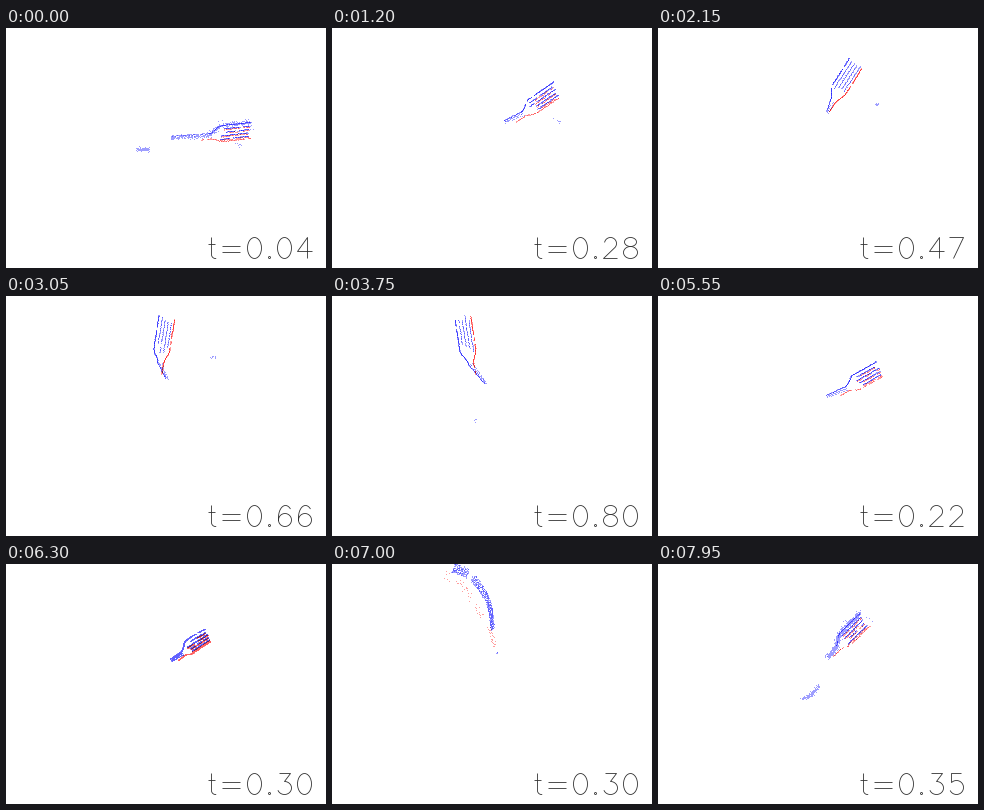
These frames come from a looping animation (320x240 px, 8 s). A matplotlib script:

```python
import numpy as np
import matplotlib.pyplot as plt
from matplotlib.animation import FuncAnimation
from matplotlib.collections import LineCollection

W, H, FRAMES, STEP_MS = 320, 240, 160, 50
SECOND_RUN, ORBIT_START, ORBIT_END = 93, 119, 154
PIVOT = np.array([143.0, 124.0])
CAM_DIST = 95.0
FADE = 0.62          # how much one event dims the other channels


# ---------- stroke lettering ----------
def arc(cx, cy, rx, ry, a0=0, a1=360):
    a = np.radians(np.linspace(a0, a1, 28))
    return list(zip(cx + rx * np.cos(a), cy + ry * np.sin(a)))


SIX = arc(11, 9, 7, 12, 45, 180) + arc(10.5, 6.5, 6.5, 6.5, 180, -180)
WIDTHS = {"t": 12, "=": 26, ".": 10}
GLYPHS = {
    "t": [[(5, 21)] + arc(9, 4, 4, 4, 180, 280), [(2, 14), (9, 14)]],
    "=": [[(4, y), (22, y)] for y in (12, 6)],
    ".": [arc(5, 1, 1, 1)],
    "0": [arc(10, 10.5, 7, 10.5)],
    "1": [[(6, 17), (8, 18), (11, 21), (11, 0)]],
    "2": [arc(10, 15, 6, 6, 170, -40) + [(3, 0), (17, 0)]],
    "3": [[(5, 21), (16, 21)] + arc(10, 6.5, 7, 6.5, 90, -160)],
    "4": [[(13, 0), (13, 21), (3, 7), (18, 7)]],
    "5": [[(15, 21), (5, 21)] + arc(10, 7, 7, 7, 135, -155)],
    "6": [SIX],
    "7": [[(3, 21), (17, 21), (7, 0)]],
    "8": [arc(10, 16.5, 6, 4.5), arc(10, 6, 7, 6)],
    "9": [[(20 - x, 21 - y) for x, y in SIX]],
}


def lettering(text, x=200.5, base=230.5):
    lines = []
    for ch in text:
        lines += [[(x + px, base - py) for px, py in s] for s in GLYPHS[ch]]
        x += WIDTHS.get(ch, 20)
    return lines


# ---------- timing ----------
def clock(i):
    """Hundredths of a second shown in the corner."""
    if i < SECOND_RUN:
        return int(4 + 1.02 * i)
    if i < ORBIT_START:
        return 4 + i - SECOND_RUN
    return 30 + max(0, i - ORBIT_END)


def orbit_angle(i):
    u = np.clip((i - ORBIT_START) / (ORBIT_END - ORBIT_START), 0, 1)
    return 2 * np.pi * u ** 3 * (u * (6 * u - 15) + 10)


def smooth(u):
    u = np.clip(u, 0, 1)
    return u * u * (3 - 2 * u)


def swing(degrees, radius):
    a = np.radians(degrees)
    return PIVOT + radius * np.array([np.cos(a), -np.sin(a)])


# ---------- event cloud ----------
class Events:
    """Brightness events gathered as a small cloud of 3D points."""

    def __init__(self, rng, density, cap):
        self.rng, self.density = rng, density
        self.caps = {"blue": cap, "red": cap, "haze": 1}
        self.parts = {name: [] for name in self.caps}

    def stroke(self, layer, pts, jitter=0.2, cover=0.96, rate=2.5):
        pts = np.asarray(pts, float)
        steps = np.hypot(*np.diff(pts[:, :2], axis=0).T)
        dist = np.concatenate([[0], np.cumsum(steps)])
        n = max(4, int(dist[-1] * rate * self.density))
        s = np.linspace(0, 1, n)
        chunks = max(3, int(dist[-1] / 3))
        on = self.rng.random(chunks) < cover
        s = s[on[np.minimum((s * chunks).astype(int), chunks - 1)]]
        xyz = np.stack([np.interp(s * dist[-1], dist, c) for c in pts.T], 1)
        xyz[:, :2] += self.rng.normal(0, jitter, (len(s), 2))
        xyz[:, 2] += self.rng.uniform(-1.5, 1.5, len(s))
        self.parts[layer].append(xyz)

    def spray(self, layer, centre, sx, sy, n):
        mean = (centre[0], centre[1], -10)
        self.parts[layer].append(self.rng.normal(mean, (sx, sy, 1), (n, 3)))

    def counts(self, layer, angle):
        out = np.zeros((H, W))
        if not self.parts[layer]:
            return out
        x, y, z = np.concatenate(self.parts[layer]).T
        keep = 1 - z / CAM_DIST
        x, y = (x - W / 2) * keep, (y - H / 2) * keep
        c, s = np.cos(angle), np.sin(angle)
        x, z = x * c + z * s, z * c - x * s
        zoom = 1 / np.maximum(1 - z / CAM_DIST, 0.2)
        col = np.floor(W / 2 + x * zoom).astype(int)
        row = np.floor(H / 2 + y * zoom).astype(int)
        ok = (col >= 0) & (col < W) & (row >= 0) & (row < H)
        np.add.at(out, (row[ok], col[ok]), 1)
        return np.minimum(out, self.caps[layer])


def fork_events(i):
    t = clock(i) / 100
    first = i < SECOND_RUN
    orbiting = ORBIT_START < i < ORBIT_END
    angle = orbit_angle(i)
    edge_on = abs(np.sin(angle)) > 0.5
    early = t < 0.45
    dense = 1.0 if i > ORBIT_END else 0.4 * max(0, 1 - i / 18)

    # the fork swings about the hand, speeding up slightly
    reach = 1 if first else 0.9
    turn = 7.5 + 102 * t + 11.5 * t * t + (0 if first else 2)
    tip = swing(turn, 105 * reach)
    base = swing(turn + 3 - 5.5 * t, (69 - 8 * t) * reach)
    grip = swing(30 + 55 * t, (24 + 24 * np.sin(np.pi * t)) * reach)
    axis = tip - base
    length = np.hypot(*axis)
    side = np.array([axis[1], -axis[0]]) / length

    def at(p, q):
        x, y = base + p * axis + q * side
        return x, y, -12 + 14 * max(p, 0) ** 2

    def outline(start, stop, neck, flare):
        ps = np.linspace(start, stop, 24)
        return [at(p, neck + flare * smooth((p + 0.15) / 0.35)) for p in ps]

    seed = ORBIT_START if ORBIT_START <= i <= ORBIT_END else i
    ev = Events(np.random.default_rng(seed + 7),
                5 if orbiting else 1, 2 if orbiting else 4)

    lead = outline(1, -0.15, 2, 6.5)
    trail = outline(0.95, -0.4, -3.5, -4)
    ev.stroke("blue", lead, rate=3)
    if edge_on:
        ev.stroke("red", trail, cover=0.5, rate=0.4)
    else:
        ev.stroke("red", trail, cover=0.9, rate=1.6 if early else 3)

        # tines
        for q in np.linspace(5, -5, 4):
            a, b = ev.rng.uniform(0.1, 0.35), ev.rng.uniform(0.85, 1)
            ev.stroke("blue", [at(a, q), at(b, q)], rate=2.4 if early else 1.5)
            if early:
                ev.stroke("red", [at(a, q - 1), at(b, q - 1)], cover=0.75, rate=1.3)

        # handle streaks
        for k, rate in zip((2, 0, -2), (2.2, 1, 0.7)):
            end = grip + k * 0.6 * side
            ev.stroke("blue", [at(-0.15, k), (*end, -12)],
                      rate=rate * (1 - 0.6 * dense))

    if dense:
        handle = [at(-0.15, 0.5), (*grip, -12)]
        ev.stroke("haze", lead, 1.3, 0.9, 9 * dense)
        ev.stroke("haze", handle, 1.3, 0.85, 9 * dense)
        ev.spray("haze", at(0.7, 4), 9, 6, int(24 * dense))
    if dense > 0.2:
        start = np.array([129 + 45 * t, 119 + 45 * t])
        stop = np.array([141 + 57 * t, 122])
        mid = (start + stop) / 2 + (0, 10 * t)
        ev.stroke("haze", [(*p, -10) for p in (start, mid, stop)], 0.9, 1, 7)

    # stray events
    if orbiting:
        ev.spray("blue", grip, 0.6, 0.6, 4)
    elif first and t < 0.8:
        ev.spray("haze", swing(2 + 64 * t, 90), 2.5, 1, 8)
    elif first:
        ev.spray("haze", PIVOT + 0.5, 0.5, 1, 4)
    return [ev.counts(layer, angle) for layer in ("blue", "red", "haze")]


def picture(i):
    blue, red, haze = fork_events(i)
    blue = np.maximum(blue, haze)
    return np.stack([FADE ** blue, FADE ** (blue + red), FADE ** red], -1)


fig = plt.figure(figsize=(4, 3), dpi=80, facecolor="white")
ax = fig.add_axes([0, 0, 1, 1])
ax.axis("off")
image = ax.imshow(np.ones((H, W, 3)), extent=(0, W, H, 0),
                  interpolation="nearest", aspect="auto")
label = LineCollection([], colors="#303030", linewidths=0.75)
label.set_snap(False)
ax.add_collection(label)
ax.set_xlim(0, W)
ax.set_ylim(H, 0)


def draw(i):
    image.set_data(picture(i))
    label.set_segments(lettering(f"t={clock(i) / 100:.2f}"))
    return image, label


anim = FuncAnimation(fig, draw, frames=FRAMES, interval=STEP_MS,
                     repeat=True, repeat_delay=0, blit=False)
plt.show()
```
